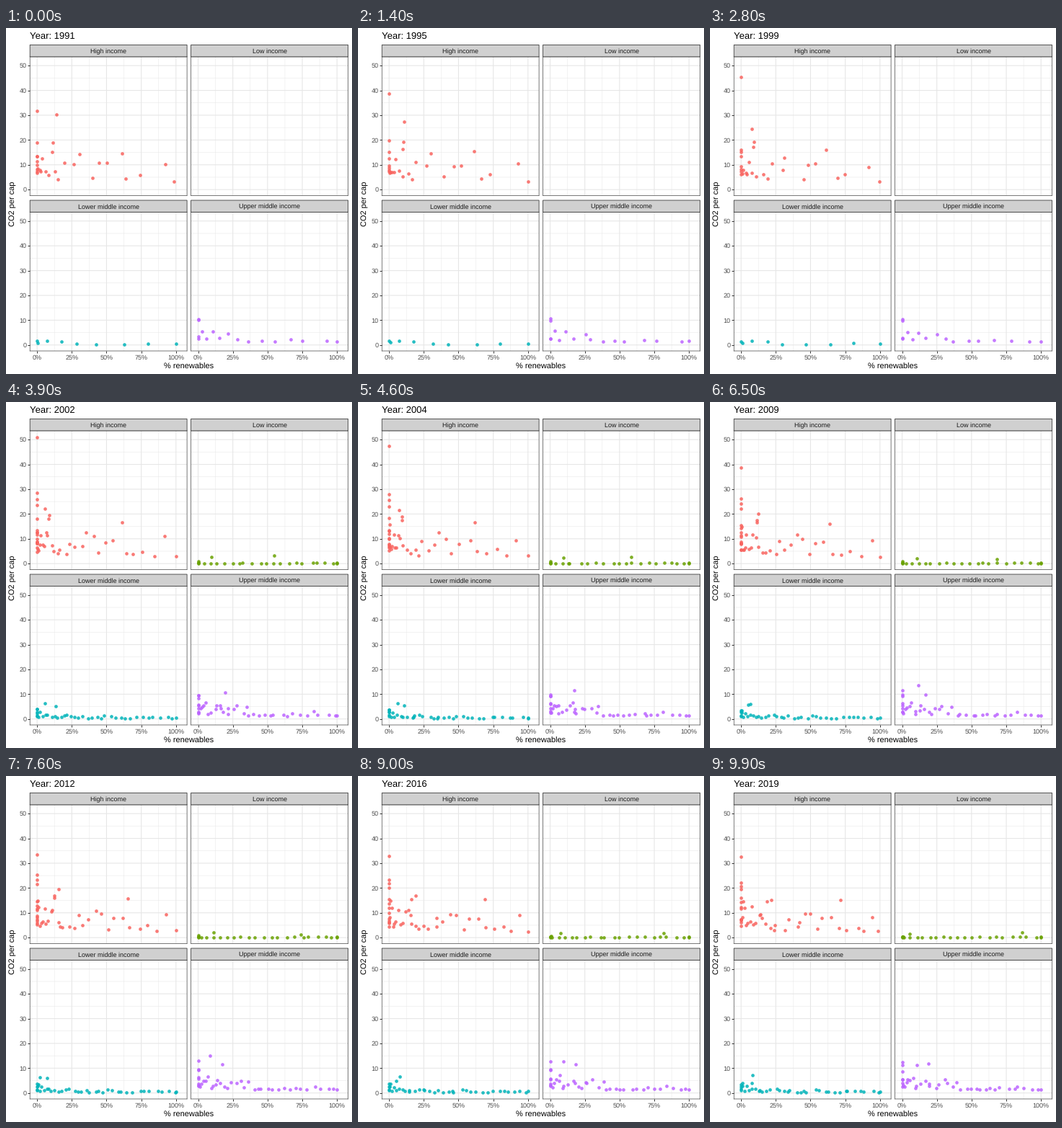
Recreate the animation shown at these times as a matplotlib script. Size 480 px wide and 480 px high, loop 10 s.

```python
import numpy as np
import matplotlib.pyplot as plt
from matplotlib.animation import FuncAnimation
from matplotlib.patches import Rectangle

plt.rcParams.update({"font.family": "Liberation Sans", "text.hinting": "none",
                     "text.hinting_factor": 1})
SIZE, DPI, FRAMES = 480, 72, 100
T = np.arange(FRAMES) / 10
END = T[-1]
FULL = 3.2  # every country reports from here on
KEYS = [0, 3.9, 7.6, END]
YEARS = np.linspace(0, END, 29)
rng = np.random.default_rng(7)


def wobble(n, amp):
    """Seeded value per point and year, joined by straight lines."""
    return np.array([np.interp(T, YEARS, rng.normal(0, amp, YEARS.size)) for _ in range(n)])


def hide_before(start, xy):
    """Stack x and y, blanking each point until it starts."""
    xy = np.stack(xy, axis=-1)
    xy[T < np.reshape(start, (-1, 1)) - 1e-6] = np.nan
    return xy


def cloud(n, n_early, skew, near, far, fall, spread, trend=(1, 1), over=3):
    """Points at evenly spaced quantiles of a skewed share; emissions fall with share."""
    q = np.linspace(0, 1, n)[:, None]
    k = np.interp(T, [0, END], skew)
    x = (100 + 2 * over) * q ** k - over
    x = np.clip(x + wobble(n, 1.2) * np.clip(x / 15, 0, 1), 0, 100)
    luck = np.exp(spread * np.clip(rng.normal(size=(n, 1)), -1.6, 1.6))
    y = (far + (near - far) * np.exp(-x / fall)) * luck * np.interp(T, [0, END], trend)
    y = np.maximum(y * (1 + wobble(n, .08)), .1)
    start = np.full(n, FULL)
    start[np.linspace(0, n - 1, n_early).round().astype(int)] = 0
    return hide_before(start, [x, y])


def track(xs, ys):
    """One outlier through the last key times."""
    times = KEYS[-len(xs):]
    start = 0 if len(xs) == len(KEYS) else FULL
    return hide_before(start, [np.interp(T, times, [v])[None] if np.isscalar(v)
                               else np.interp(T, times, v)[None] for v in (xs, ys)])


def fan(n, first, last):
    """Producers without renewables, evenly spread between two levels."""
    a, b = np.linspace(*first, n), np.linspace(*last, n)
    return np.concatenate([track([0, 0, 0], [u, (u + v) / 2, v]) for u, v in zip(a, b)])


high = np.concatenate([
    cloud(36, 26, (3.6, 2.3), 9, 5.2, 40, .38, (1.1, .85), 1),
    fan(3, (28.5, 23.5), (22, 19.4)),
    fan(3, (13.3, 10), (16, 12.3)),
    track([0, 0, 0, 0], [31.8, 50.8, 33.4, 32.5]),
    track([14, 5.5, 15.5, 21.5], [30.4, 22, 19.5, 15.2]),
    track([11.2, 8.7, 12.5, 18.5], [19, 19.5, 16.8, 14.6]),
    track([10.6, 8.3, 12.5, 15], [15.3, 18, 16, 7.9]),
    track([61.4, 61, 65.3, 71.5], [14.7, 16.7, 15.8, 15.3]),
])
low = np.concatenate([
    cloud(24, 0, (1, 1.2), .2, .2, 1, .4, over=9),
    track([0, 0, 1], [1, 1, .3]),
    track([9.5, 11.3, 5.5], [2.6, 2, 1.6]),
    track([55, 74, 86.5], [3.1, 1.3, 2.2]),
])
lower = np.concatenate([
    cloud(38, 9, (1.7, 1.5), 1.7, .6, 10, .55),
    track([0, 1, 1], [3.9, 3.4, 4]),
    track([5.9, 7.2, 8], [6.3, 6, 7.2]),
    track([13.2, 2, 7.5], [5.1, 6.2, 4]),
])
upper = np.concatenate([
    cloud(40, 17, (2.1, 1.8), 5, 1.3, 30, .42),
    track([0, 0, 0], [8.5, 13, 12.3]),
    track([19.3, 8.4, 10.5], [10.8, 14.9, 11.4]),
    track([16, 17.5, 18.8], [5.5, 11.5, 11.8]),
])

fig = plt.figure(figsize=(SIZE / DPI, SIZE / DPI), dpi=DPI, facecolor="white")
WIDTH, STRIP, HEIGHT = 217.9, 16.5, 192.5
LEFT, RIGHT, TOP, BOTTOM = 33.2, 256.6, 23.4, 239


def label(x, y, s, size, color="black", **kw):
    return fig.text(x / SIZE, 1 - y / SIZE, s, fontsize=size, color=color, **kw)


def panel(left, top, name, color, points):
    """Title strip with a plot below; left and top are the strip's corner in pixels."""
    base = 1 - (top + STRIP) / SIZE
    fig.add_artist(Rectangle((left / SIZE, base), WIDTH / SIZE, STRIP / SIZE,
                             fc="#D0D0D0", ec="#333333", lw=.8, snap=False))
    label(left + WIDTH / 2, top + 11.6, name, 8.8, "#1A1A1A", ha="center")

    ax = fig.add_axes([left / SIZE, base - HEIGHT / SIZE, WIDTH / SIZE, HEIGHT / SIZE])
    ax.set(xlim=(-5.14, 107.94), ylim=(-2.4, 53.56))
    xs, ys = np.arange(0, 101, 25), np.arange(0, 51, 10)
    ax.set_xticks(xs, [])
    ax.set_yticks(ys, [])
    for line, marks in ((ax.axvline, xs), (ax.axhline, ys)):
        step = marks[1]
        for v in marks:
            line(v, color="#E6E6E6", lw=1.07, zorder=1, snap=False)
        for v in marks[:-1] + step / 2:
            line(v, color="#E8E8E8", lw=.55, zorder=.5, snap=False)
    ax.tick_params(color="#333333", width=1, length=2.75,
                   left=left == LEFT, bottom=top == BOTTOM)
    for s in ax.spines.values():
        s.set(color="#333333", linewidth=.65, snap=False)

    def pixel(value, limits, length):
        return length * (value - limits[0]) / (limits[1] - limits[0])

    if left == LEFT:
        for v in ys:
            y = top + STRIP + HEIGHT - pixel(v, ax.get_ylim(), HEIGHT)
            label(28.6, y + 3.2, f"{v}", 8.8, "#4D4D4D", ha="right")
    if top == BOTTOM:
        for v in xs:
            label(left + pixel(v, ax.get_xlim(), WIDTH), 460, f"{v}%", 8.8, "#4D4D4D",
                  ha="center")
    dots = ax.scatter([], [], s=22, color=color, alpha=.85, linewidths=0, zorder=3)
    dots.set_snap(False)
    return dots, points


panels = [
    panel(LEFT, TOP, "High income", "#F8635E", high),
    panel(RIGHT, TOP, "Low income", "#69A100", low),
    panel(LEFT, BOTTOM, "Lower middle income", "#00B3B9", lower),
    panel(RIGHT, BOTTOM, "Upper middle income", "#BB63FF", upper),
]
label(253.8, 473, "% renewables", 11, ha="center")
label(9.3, 244, "CO2 per cap", 11, ha="center", va="center", rotation=90)
title = label(32.8, 15, "", 13.2)


def draw(i):
    title.set_text(f"Year: {round(1991 + 28 * i / (FRAMES - 1))}")
    for dots, points in panels:
        now = points[:, i]
        dots.set_offsets(now[~np.isnan(now[:, 0])])
    return [title] + [dots for dots, _ in panels]


anim = FuncAnimation(fig, draw, frames=FRAMES, interval=100, repeat=True, repeat_delay=0)
plt.show()
```
